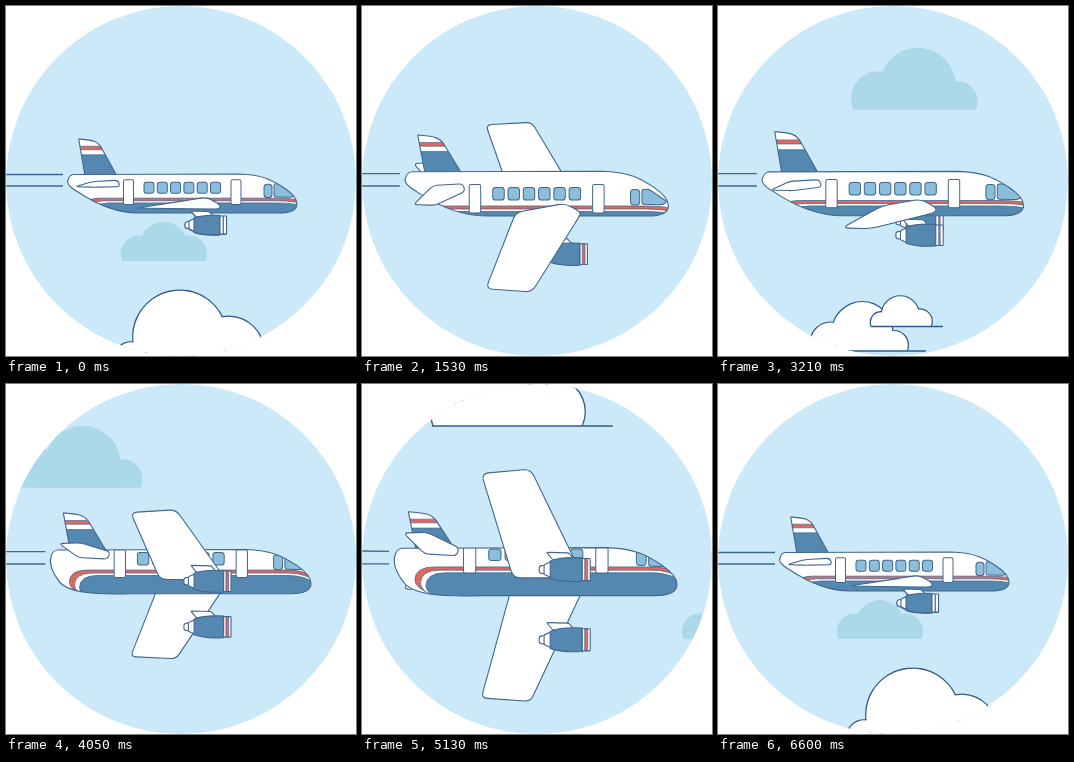
Write an HTML page with a canvas that moves like this. It is 350 by 350 pixels and loops after 6.63 s.

```html
<!DOCTYPE html>
<html lang="en">
<head>
<meta charset="utf-8">
<title>Plane</title>
<style>
html, body { margin: 0; width: 100%; height: 100%; overflow: hidden; background: #fff; }
canvas { display: block; width: 350px; height: 350px; }
</style>
</head>
<body>
<canvas id="stage"></canvas>
<script>
const LOOP = 6630;
const SKY = '#cbe9f8', MIST = '#abd9ea', INK = '#40668f', EDGE = '#31588a';
const BLUE = '#5488b0', GLASS = '#8abedb', RED = '#e2675f', WHITE = '#fff';

const cv = document.getElementById('stage');
const ratio = window.devicePixelRatio || 1;
cv.width = cv.height = 350 * ratio;
const c = cv.getContext('2d');

const clamp = (v, a, b) => Math.min(b, Math.max(a, v));

// Cosine easing between [time, value] turning points.
const ease = keys => t => {
  let i = 0;
  while (i < keys.length - 2 && t > keys[i + 1][0]) i++;
  const [t0, a] = keys[i], [t1, b] = keys[i + 1];
  const u = clamp((t - t0) / (t1 - t0), 0, 1);
  return a + (b - a) * (1 - Math.cos(Math.PI * u)) / 2;
};

// Positive roll dips the near wing.
const rollAt = ease([[800, 3], [1480, 74], [2085, -75], [2850, 30], [4780, -106], [6240, 3]]);
const zoomAt = ease([[800, 1], [2150, 1.262], [3750, 1.098], [4780, 1.285], [6000, 1]]);

/* ---- drawing helpers ---- */
function paint(fill) {
  c.fillStyle = fill;
  c.fill();
  c.stroke();
}

// Closed polygon with softened corners.
function shape(pts, r, fill) {
  const n = pts.length;
  const near = (p, q) => {
    const len = Math.hypot(q[0] - p[0], q[1] - p[1]) || 1;
    const k = Math.min(r / len, 0.5);
    return [p[0] + (q[0] - p[0]) * k, p[1] + (q[1] - p[1]) * k];
  };
  c.beginPath();
  pts.forEach((p, i) => {
    c.lineTo(...near(p, pts[(i + n - 1) % n]));
    c.quadraticCurveTo(...p, ...near(p, pts[(i + 1) % n]));
  });
  c.closePath();
  paint(fill);
}

function box(x, y, w, h, r, fill) {
  shape([[x, y], [x + w, y], [x + w, y + h], [x, y + h]], r, fill);
}

/* ---- clouds ---- */
// Lobes of the given radii stand side by side on a base; the largest is at x when t = at.
function cloud(mist, at, x, base, ...radii) {
  const R = Math.max(...radii);
  const gap = i => 1.05 * Math.max(radii[i], radii[i + 1]);
  const xs = [0];
  for (let i = 0; i < radii.length - 1; i++) xs.push(xs[i] + gap(i));
  const shift = x - xs[radii.indexOf(R)];
  const lobes = radii.map((r, i) => [xs[i] + shift, base - r * (r === R ? 0.63 : 0.42), r]);
  return { mist, at, base, R, lobes, speed: mist ? 0.12 + 0.0007 * R : 0.7 };
}

const CLOUDS = [
  cloud(true, 0, 158, 255, 18, 24, 18),
  cloud(true, 3210, 200, 103.7, 27, 38, 20),
  cloud(false, 0, 174.5, 360.5, 17, 46.5, 35),
  cloud(false, 1040, 175, 42, 20, 47, 34),
  cloud(false, 2250, 48, 135, 13, 22),
  cloud(false, 2250, 113, 135, 20, 47, 34),
  cloud(false, 3210, 145, 345, 20, 30, 14),
  cloud(false, 3210, 183, 320.5, 10, 18.5, 12),
  cloud(false, 5080, 175, 42, 20, 47, 34),
  cloud(false, 5640, 107, 77, 20, 28.5, 15)
];

function drawCloud({ mist, at, base, R, lobes, speed }, t) {
  const dt = ((t - at + LOOP * 1.5) % LOOP) - LOOP / 2;
  const first = lobes[0], last = lobes[lobes.length - 1];
  c.save();
  c.translate(-speed * dt, 0);
  c.save();
  c.beginPath();
  c.rect(-100, -200, 600, 200 + base);
  c.clip();
  c.beginPath();
  for (const [x, y, r] of lobes) {
    c.moveTo(x + r, y);
    c.arc(x, y, r, 0, 7);
  }
  c.strokeStyle = EDGE;
  c.lineWidth = 2.4;
  if (!mist) c.stroke();
  c.fillStyle = mist ? MIST : WHITE;
  c.fill();
  c.fillRect(first[0], base - 5, last[0] - first[0], 5);
  c.restore();
  if (!mist) {
    c.lineWidth = 1.3;
    c.strokeStyle = EDGE;
    c.beginPath();
    c.moveTo(first[0] - first[2], base);
    c.lineTo(last[0] + last[2] + 0.6 * R, base);
    c.stroke();
  }
  c.restore();
}

/* ---- plane ---- */
function drawEngine(y, w) {
  c.save();
  c.translate(0, y);
  shape([[-2, -14], [16, -13.5], [21, -8], [3, -8]], 1, WHITE);
  shape([[-8, -3], [-3, -3.5], [-3, 3.5], [-8, 3]], 2, WHITE);
  shape([[-4, -4], [2, -6.5], [2, 6.5], [-4, 4]], 1, WHITE);
  c.beginPath();
  c.moveTo(1, -7);
  c.quadraticCurveTo(10, -10.5, 27, -9.5);
  c.lineTo(27, 9.5);
  c.quadraticCurveTo(10, 10.5, 1, 7);
  c.closePath();
  paint(BLUE);
  box(27, -9, 6.5, 18, 0.6, WHITE);
  const band = 0.4 + clamp(Math.abs(w) / 20, 0, 2);
  c.save();
  c.lineWidth *= 0.6;
  box(30.2 - band / 2, -8.8, band, 17.6, 0, RED);
  c.restore();
  c.restore();
}

function bodyPath(k) {
  c.beginPath();
  c.moveTo(-119, -18.5);
  c.lineTo(46, -19);
  c.bezierCurveTo(70, -18.5, 80, -12.5, 92, -4.5);
  c.bezierCurveTo(100, 1, 104, 6, 104, 11);
  c.bezierCurveTo(104, 17, 97, 20, 86, 20);
  c.lineTo(-55, 20);
  c.bezierCurveTo(-75 - 10 * k, 20 + k, -94 - 18 * k, 13 + 7 * k, -115 - 4 * k, -1 + 9 * k);
  c.bezierCurveTo(-122 - 2 * k, -5 + 6 * k, -127, -9 + 2 * k, -125, -13);
  c.bezierCurveTo(-124, -17, -121, -18.5, -119, -18.5);
  c.closePath();
}

// Everything below y, with a round end at x and a dip at the nose.
function belly(y, x, drop, fill) {
  c.beginPath();
  c.moveTo(110, y + drop);
  c.quadraticCurveTo(100, y, 84, y);
  c.lineTo(x + 16, y);
  c.quadraticCurveTo(x, y, x, y + 11);
  c.quadraticCurveTo(x + 1, y + 18, x + 14, y + 22);
  c.lineTo(x + 14, 30);
  c.lineTo(110, 30);
  c.closePath();
  paint(fill);
}

function drawFin(w) {
  const top = -54 + w * w * 0.0007, h = -18 - top;
  const path = () => {
    c.beginPath();
    c.moveTo(-108, -17);
    c.lineTo(-114.3, top);
    c.bezierCurveTo(-102, top + 1, -95, top + 1, -90.5, top + h * 0.3);
    c.lineTo(-76, -17);
    c.closePath();
  };
  path();
  c.fillStyle = WHITE;
  c.fill();
  c.save();
  c.clip();
  c.lineWidth *= 0.6;
  box(-120, top + h * 0.2, 50, h * 0.1, 0, RED);
  box(-120, top + h * 0.44, 50, h, 0, BLUE);
  c.restore();
  path();
  c.stroke();
}

function drawBody(w) {
  const k = clamp(-w / 65, 0, 1);
  const mid = -5.4 + 0.085 * w;
  const red = 6.2 + 0.09 * w;
  const thin = 1 - 0.22 * clamp((-w - 60) / 45, 0, 1);
  const drop = 3 + 6 * k;
  bodyPath(k);
  c.fillStyle = WHITE;
  c.fill();
  c.save();
  c.clip();
  c.lineWidth *= 0.7;
  belly(red - 1.3, -109, drop, RED);
  belly(red + 1.3, -104.5, drop, WHITE);
  belly(red + 3.5, -100, drop, BLUE);
  c.lineWidth *= 1.3;
  for (const x of [-69.5, 38]) box(x, mid + 4.3 - 12.4 * thin, 10, 24.8 * thin, 1.5, WHITE);
  for (let i = 0; i < 6; i++) box(-49 + 13.3 * i, mid - 5.5 * thin, 10, 11 * thin, 2.5, GLASS);
  const cy = mid + 3;
  box(71, cy - 6.7 * thin, 8, 13.4 * thin, 3, GLASS);
  shape([[81, cy - 7], [87, cy - 7], [103, cy + 4], [99, cy + 6.5], [81, cy + 6.2]], 2, GLASS);
  c.restore();
  bodyPath(k);
  c.stroke();
}

// +1 when the upper face of a near surface shows, -1 for the lower one.
const faceOf = w => clamp((w + 17) / 20, -1, 1);

function drawTailplane(w) {
  const tip = -8 + 0.24 * w, root = -9.5 + 0.07 * w, g = faceOf(w);
  shape([[-118, tip + g], [-99, tip + 1.5 * g], [-73, root + 3 * g],
    [-75, root - 3.5 * g], [-101, root - 2 * g]], 3.5, WHITE);
}

function drawNearWing(w) {
  const tip = 12 + w, root = 12 + 0.07 * w, g = faceOf(w);
  const open = clamp(Math.abs(w) / 30, 0, 1);
  shape([[-55, tip], [-55 + 40 * open, tip + 0.04 * w], [26, root + 4 * g],
    [28, root], [14, root - 4 - 4 * g], [-6 - 23 * open, root - 5 * (1 - open)]], 6, WHITE);
}

function drawFarWing(w) {
  const tip = 12 - w;
  shape([[-55, tip], [-15, tip - 0.03 * w], [29, 12], [-30, 12]], 5, WHITE);
}

// Engines hang below the wings, so the face in view decides the order.
function stack(engineOnTop, wing, engine) {
  if (engineOnTop) { wing(); engine(); }
  else { engine(); wing(); }
}

function drawTrail(t, s) {
  const x = 187 - 130 * s;
  const bend = Math.exp(-(((t - 4740) / 220) ** 2));
  c.strokeStyle = INK;
  c.lineWidth = 1.3;
  for (const [y, up, down] of [[168.5 - 6 * (s - 1), 3, 6], [180, 4.5, -1]]) {
    c.beginPath();
    c.moveTo(-2, y - up * bend);
    c.quadraticCurveTo(x / 2, y - up * 0.7 * bend, x, y + down * bend);
    c.stroke();
  }
}

function drawPlane(t) {
  const w = rollAt(t), s = zoomAt(t);
  drawTrail(t, s);
  c.save();
  c.translate(187, 187);
  c.scale(s, s);
  c.strokeStyle = INK;
  c.lineWidth = 1.1 / s;

  const farTail = -8 - 0.25 * w;
  shape([[-118, farTail], [-102, farTail], [-74, -10], [-104, -10]], 4, WHITE);
  const farEngine = 34 - (w < 0 ? 0.24 : 0.5) * w;
  stack(w < 0, () => drawFarWing(w), () => drawEngine(farEngine, w));

  drawFin(w);
  drawBody(w);
  drawTailplane(w);

  const nearEngine = 31 + 0.33 * w - 0.00025 * w * w;
  stack(w < -10, () => drawNearWing(w), () => drawEngine(nearEngine, w));
  c.restore();
}

function draw(t) {
  c.setTransform(ratio, 0, 0, ratio, 0, 0);
  c.fillStyle = WHITE;
  c.fillRect(0, 0, 350, 350);
  c.lineJoin = 'round';
  c.save();
  c.beginPath();
  c.arc(175, 175, 175, 0, 7);
  c.clip();
  c.fillStyle = SKY;
  c.fillRect(0, 0, 350, 350);
  for (const k of CLOUDS) drawCloud(k, t);
  drawPlane(t);
  c.restore();
}

const start = performance.now();
function tick() {
  draw((performance.now() - start) % LOOP);
  requestAnimationFrame(tick);
}
tick();
</script>
</body>
</html>
```
